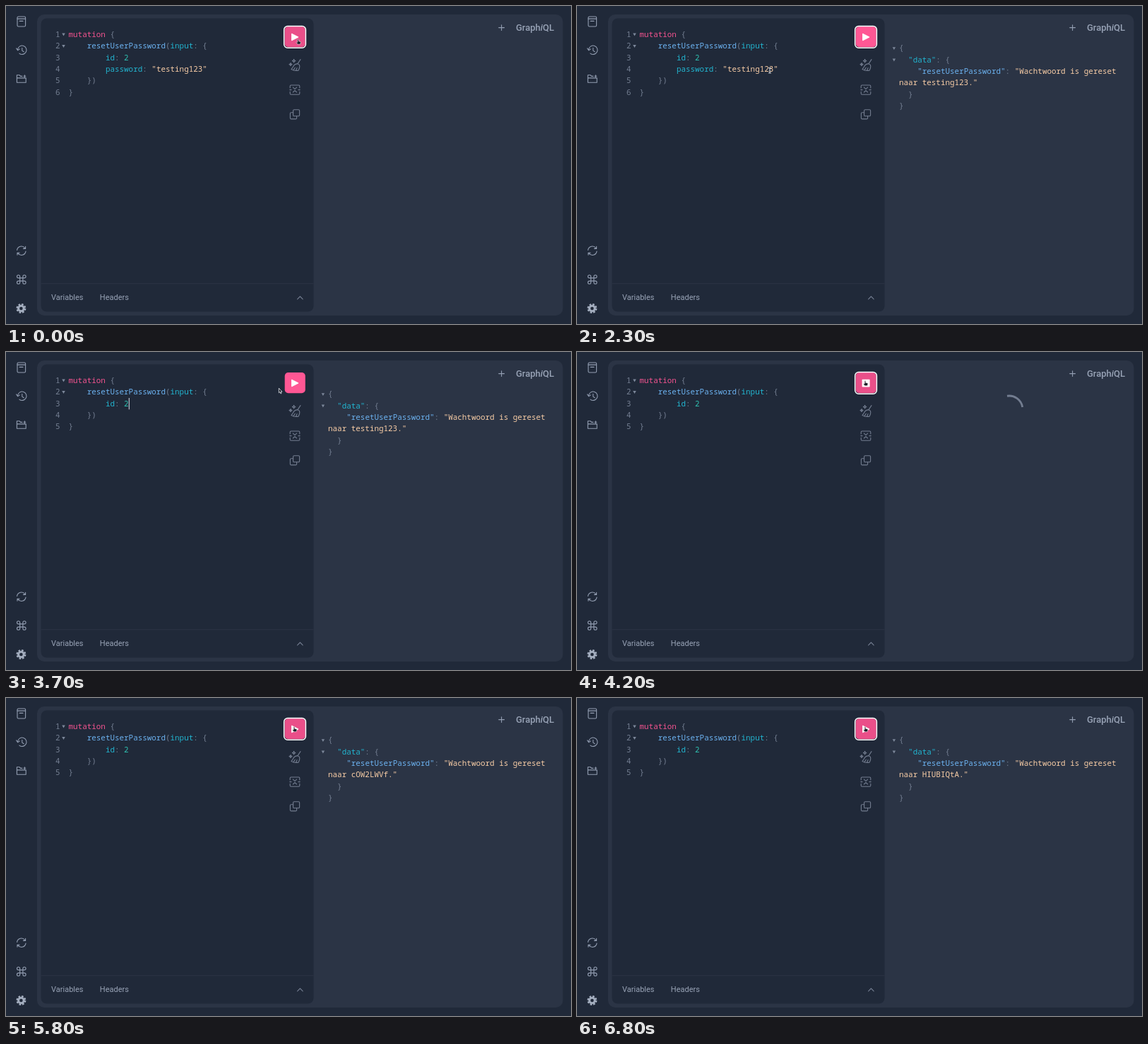
Write an HTML page that moves like this. It is 800x450 px and loops after 7300 ms.

```html
<!DOCTYPE html>
<html lang="en">
<head>
<meta charset="utf-8">
<title>GraphiQL</title>
<style>
html, body { margin: 0; width: 100%; height: 100%; overflow: hidden; background: #202939; }
svg { display: block; width: 800px; height: 450px; }
text { white-space: pre; }
.code { font: 10.92px "Noto Sans Mono", "DejaVu Sans Mono", monospace; }
.ui { font-family: Roboto, sans-serif; fill: #98a3b6; }
.icons g { fill: none; stroke: #939eb2; stroke-width: 1.1; stroke-linecap: round; stroke-linejoin: round; }
.icons .dim { stroke: #737d90; }
.fold { fill: #7c879a; }
</style>
</head>
<body>
<svg viewBox="0 0 800 450" xmlns="http://www.w3.org/2000/svg">
  <rect width="800" height="450" fill="#202939"/>
  <rect x="44" y="12" width="744.5" height="426" rx="10" fill="#2b3445"/>
  <rect x="49.5" y="17.5" width="386" height="415" rx="8" fill="#202939"/>
  <path d="M49.5 392.8H435.5" stroke="#2b3445" stroke-width="1"/>

  <g class="ui">
    <text x="64" y="416.2" font-size="11">Variables</text>
    <text x="132.8" y="416.2" font-size="11">Headers</text>
    <text x="722" y="34.6" font-size="13" font-weight="500">Graph<tspan font-style="italic">i</tspan>QL</text>
  </g>

  <g class="icons">
    <g transform="translate(21.8 22)"><rect x="-5.8" y="-7" width="11.6" height="14" rx="1.6"/><path d="M-5.8-3.9H5.8M-2.6-.6H2.2"/></g>
    <g transform="translate(22 62.5)"><path d="M-5.3-1.4A6.2 6.2 0 1 1-3.1 4.6M-7.3-2.6L-5.4.2-2.6-1.6M.8-3.2V.6L3.2 2.2"/></g>
    <g transform="translate(21.8 103.1)"><path d="M1-3.7H-1.3L-2.6-5.3H-6.4V5.2H6.4V-1.2M-6.4-1.2H6.4M4.6-5.2V-2.4M3.2-3.8H6"/></g>
    <g transform="translate(21.8 346.3)"><path d="M-6.2-.8A6.2 6.2 0 0 1 5-3.6M5.8-6V-2.9H2.7M6.2.8A6.2 6.2 0 0 1-5 3.6M-5.8 6V2.9H-2.7"/></g>
    <g transform="translate(21.8 387)"><path d="M-2.1-2.1H2.1V2.1H-2.1ZM-2.1-2.1H-4.2A2.1 2.1 0 1 1-2.1-4.2ZM2.1-2.1V-4.2A2.1 2.1 0 1 1 4.2-2.1ZM2.1 2.1H4.2A2.1 2.1 0 1 1 2.1 4.2ZM-2.1 2.1V4.2A2.1 2.1 0 1 1-4.2 2.1Z"/></g>
    <g transform="translate(21.4 428)"><circle r="3.8" stroke-width="3" stroke="#a3adbe"/><circle r="5.8" stroke-width="2.4" stroke="#a3adbe" stroke-linecap="butt" stroke-dasharray="2.6 1.955"/></g>
    <g transform="translate(701.6 30.6)"><path d="M-3.9 0H3.9M0-3.9V3.9"/></g>
    <g class="dim" transform="translate(416.4 412.8)"><path d="M-3.8 2L0-1.8 3.8 2"/></g>
    <g class="dim" transform="translate(409 83.6)"><path d="M8-8L4-2M4-2Q-1-1.6-2.6 2.6L-5 6Q-1 8.4 5 7.6Q7.6 3 6.4-.2ZM-1.8 6.8L.2 3.6M1.6 7.6L3 4M-1.4-8.4Q-1.2-6.2.8-6Q-1.2-5.8-1.4-3.6Q-1.6-5.8-3.6-6Q-1.6-6.2-1.4-8.4ZM-6-3Q-5.8-1.2-4-1Q-5.8-.8-6 1Q-6.2-.8-8-1Q-6.2-1.2-6-3Z"/></g>
    <g class="dim" transform="translate(409 118.6)"><path d="M-6.8-2.6V-5.2Q-6.8-6.6-5.4-6.6H5.4Q6.8-6.6 6.8-5.2V-2.6M-6.8 2.6V5.2Q-6.8 6.6-5.4 6.6H5.4Q6.8 6.6 6.8 5.2V2.6M-2.6-3.4L0-1L2.6-3.4M-2.6 3.4L0 1L2.6 3.4M-7.2 0H-5M5 0H7.2"/></g>
    <g class="dim" transform="translate(409 153.3)"><rect x="-2.4" y="-6.6" width="9" height="9" rx="1.4"/><path d="M-2.4-2.6H-5.2Q-6.6-2.6-6.6-1.2V5.2Q-6.6 6.6-5.2 6.6H1.2Q2.6 6.6 2.6 5.2V2.4"/></g>
  </g>

  <path id="select" d="M174 65.2H380V81.6H285V98H88.5V81.6H174Z" fill="#374152"/>
  <g id="editor" class="code"></g>
  <rect id="caret" width="1" height="16.3" fill="#d5dbe6"/>
  <path class="fold" d="M79.2 38.6h4.6l-2.3 4zM79.2 55h4.6l-2.3 4z"/>

  <g id="reply" class="code"></g>
  <path id="folds" class="fold" d="M446.7 58.2h4.4l-2.2 3.9zM446.7 74.6h4.4l-2.2 3.9z"/>
  <path id="spinner" d="M598.6 67.6A19 19 0 0 1 625.4 67.6" fill="none" stroke="#737d90" stroke-width="2.9"/>

  <rect id="button" x="394.7" y="29.1" width="29.1" height="29.2" rx="5"/>
  <rect id="ring" x="393.7" y="28.6" width="30.7" height="30.7" rx="5" fill="none" stroke="#fff" stroke-width="1.5"/>
  <path id="play" d="M404.6 39.2L414 44L404.6 48.8Z" fill="#fff" stroke="#fff" stroke-width="1" stroke-linejoin="round"/>
  <rect id="stop" x="403.6" y="38.7" width="11" height="10.8" rx=".8" fill="#fff"/>

  <g id="pointer">
    <path id="hand" d="M-1.6-3.6Q-.8-4.4 0-3.6V-1.2L2.6-.6Q3.2-.2 3 .8L2.4 3.2H-1.4L-3.2.6Q-3-.4-1.6.4Z" fill="#181b24" stroke="#f3e9ef" stroke-width=".6"/>
    <path id="beam" d="M-1.8-3.6H1.8M0-3.6V3.6M-1.8 3.6H1.8" fill="none" stroke="#e6e9ef" stroke-width="1"/>
    <path id="arrow" d="M-1.6-3.8V2.8L-.1 1.5L1 4L2 3.5L1 1.2H3Z" fill="#181b24" stroke="#e6e9ef" stroke-width=".8"/>
  </g>
</svg>
<script>
const LOOP = 7300, STEP = 100, CHAR = 6.552, ROW = 16.33;
const $ = id => document.getElementById(id);
const show = (id, on) => $(id).setAttribute('visibility', on ? 'visible' : 'hidden');

const ink = {
  pink: '#f2538f', blue: '#6cb2f0', teal: '#22b4cf', num: '#2fc0b0',
  text: '#f8cda6', grey: '#747f92'
};

// A row is [column, colour, text, colour, text, ...].
function rows(list, x, y) {
  return list.map(([col, ...parts], i) => {
    let spans = '';
    for (let k = 0; k < parts.length; k += 2)
      spans += `<tspan fill="${ink[parts[k]]}">${parts[k + 1]}</tspan>`;
    return `<text x="${x + col * CHAR}" y="${y + i * ROW}">${spans}</text>`;
  }).join('');
}

function editorRows(full) {
  const list = [
    [0, 'pink', 'mutation', 'grey', ' {'],
    [4, 'blue', 'resetUserPassword', 'grey', '(', 'teal', 'input', 'grey', ': {'],
    [8, 'teal', 'id', 'grey', ': ', 'num', '2'],
    [8, 'teal', 'password', 'grey', ': ', 'text', '"testing123"'],
    [4, 'grey', '})'],
    [0, 'grey', '}']
  ];
  if (!full) list.splice(3, 1);
  const numbers = list.map((_, i) => [0, 'grey', i + 1]);
  return rows(numbers, 70, 44) + rows(list, 88.5, 44);
}

function replyRows(word) {
  return word ? rows([
    [0, 'grey', '{'],
    [2, 'teal', '"data"', 'grey', ': {'],
    [4, 'blue', '"resetUserPassword"', 'grey', ': ', 'text', '"Wachtwoord is gereset'],
    [0, 'text', `naar ${word}."`],
    [2, 'grey', '}'],
    [0, 'grey', '}']
  ], 456, 63.2) : '';
}

// Each run: spinner start, reply, fold arrows, new password.
const runs = [
  [100, 200, 800, 'testing123'],
  [4200, 4300, 4900, 'cOW2LWVf'],
  [6100, 6200, 6700, 'HIUBIQtA']
];

// Pointer path: time, x, y.
const path = [
  [0, 414.3, 51], [1200, 414.3, 51], [1300, 413.4, 51], [1400, 372, 60], [1600, 256, 90],
  [1700, 222, 97], [1800, 225, 96], [2000, 240, 92], [2400, 284, 91],
  [2600, 300, 90], [2800, 300, 89], [2900, 300, 79], [3000, 300, 75],
  [3100, 300, 74], [3300, 300, 74], [3500, 334, 66], [3700, 388, 55],
  [3900, 408.8, 44.6], [LOOP, 408.8, 44.6]
];

function pointerAt(t) {
  const i = path.findIndex(p => p[0] > t);
  const [t0, x0, y0] = path[i - 1], [t1, x1, y1] = path[i];
  const k = (t - t0) / (t1 - t0);
  return [x0 + (x1 - x0) * k, y0 + (y1 - y0) * k];
}

const cache = {};
function fill(id, key, make) {
  if (cache[id] === key) return;
  cache[id] = key;
  $(id).innerHTML = make(key);
}

function draw(t) {
  const run = runs.filter(r => t >= r[0]).pop();
  const busy = !!run && t < run[1];
  fill('editor', t < 3300, editorRows);
  fill('reply', run && !busy ? run[3] : '', replyRows);
  show('folds', run && t >= run[2]);
  show('spinner', busy);
  if (busy) $('spinner').setAttribute('transform', `rotate(${36 + (t - run[0]) * 0.45} 612 81)`);

  const hover = t < 1400 || t >= 3900;
  $('button').setAttribute('fill', hover ? '#ea4f89' : '#ff5794');
  show('ring', t < 2500 || t >= 4100);
  show('play', !busy);
  show('stop', busy);

  const picked = t >= 2900;
  show('select', picked && t < 3300);
  show('caret', t >= 2500 && t < 3900);
  $('caret').setAttribute('x', picked ? 173.8 : 285);
  $('caret').setAttribute('y', picked ? 65 : 81.4);

  const [x, y] = pointerAt(t);
  $('pointer').setAttribute('transform', `translate(${x} ${y})`);
  const edge = !hover && x > 380;
  show('hand', hover);
  show('arrow', edge);
  show('beam', !hover && !edge);
}

const start = performance.now();
function tick() {
  const t = (performance.now() - start) % LOOP;
  draw(Math.floor(t / STEP) * STEP);
  requestAnimationFrame(tick);
}
tick();
</script>
</body>
</html>
```
